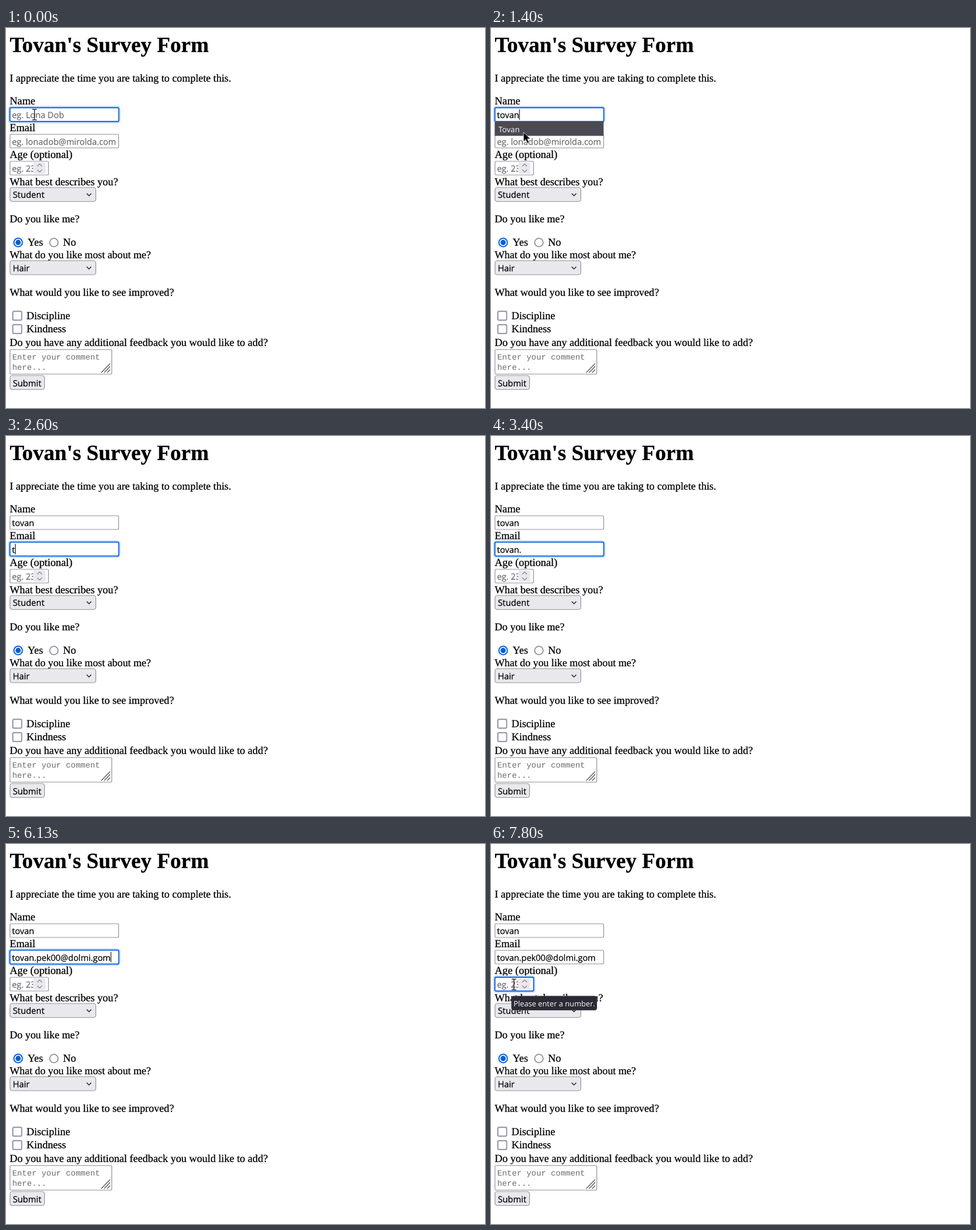
Animation of 840x667 px, one loop 8000 ms. Source, as an HTML page:

```html
<!DOCTYPE html>
<html lang="en">
<head>
<meta charset="utf-8">
<title>Survey Form</title>
<style>
  html, body { margin: 0; width: 100%; height: 100%; overflow: hidden; background: #fff; }
  svg { display: block; width: 840px; height: 667px; }
  text { white-space: pre; text-rendering: geometricPrecision; }
  .serif { font-family: "Liberation Serif", "Times New Roman", serif; stroke: #000; stroke-width: .3; }
  .ui { font-family: "Open Sans", "Noto Sans", sans-serif; stroke: #000; stroke-width: .25; }
  .mono { font-family: "Liberation Mono", monospace; }
  .hint { fill: #6c6c6c; }
  .ui.hint { stroke: #6c6c6c; }
  .light { fill: #fbfbfe; stroke: none; }
  .box { fill: #fff; stroke: #8f8f9d; stroke-width: 1.2; }
  .grey { fill: #e9e9ed; }
  .line { fill: none; stroke: #222; stroke-width: 1.5; }
</style>
</head>
<body>
<svg id="stage" viewBox="0 0 840 667" xmlns="http://www.w3.org/2000/svg"></svg>
<script>
const LOOP = 8000;
const stage = document.getElementById('stage');

const label = (x, y, s, size = 18.6, font = 'serif', extra = '') =>
  `<text class="${font}" x="${x}" y="${y}" font-size="${size}" ${extra}>${s}</text>`;
const rect = (x, y, w, h, r, cls = 'box', extra = '') =>
  `<rect class="${cls}" x="${x}" y="${y}" width="${w}" height="${h}" rx="${r}" ${extra}/>`;
const select = (y, s, size) =>
  rect(7, y, 150.5, 24.5, 4, 'box grey') + label(12, y + 18, s, size, 'ui') +
  `<path class="line" d="M141.5 ${y + 10.5}l4 4 4-4"/>`;
const check = (y, s) => rect(12, y, 15.5, 15.5, 2, 'box', 'style="stroke-width:1.9"') + label(36, y + 13.5, s);

const FIELDS = {
  name:  { y: 140, w: 190.5, hint: 'eg. Lona Dob' },
  email: { y: 186.5, w: 190.5, hint: 'eg. lonadob@mirolda.com' },
  age:   { y: 234, w: 67.5, hint: 'eg. 23' }
};
const field = (id, { y, w, hint }) => `
  <g id="${id}">
    ${rect(7, y, w, 24, 2)}
    <g class="ring" fill="none">
      ${rect(5, y - 2, w + 4, 28, 4.5, '', 'stroke="#bcd6fb" stroke-width="2.4"')}
      ${rect(6.8, y - .2, w + .4, 24.4, 2.5, '', 'stroke="#0060df" stroke-width="1.7"')}
    </g>
    <text class="ui value" x="10.5" y="${y + 18}" font-size="14.9"
      ${id === 'age' ? 'clip-path="url(#ageClip)"' : ''}>${hint}</text>
  </g>`;

stage.innerHTML = `
  <clipPath id="ageClip"><rect x="8" y="230" width="40" height="30"/></clipPath>
  ${label(6.5, 41.5, "Tovan's Survey Form", 38, 'serif', 'font-weight="700"')}
  ${label(6.5, 94, 'I appreciate the time you are taking to complete this.', 18.47)}
  ${label(6.5, 134, 'Name', 18.8)}
  ${label(6.5, 181, 'Email', 18.8)}
  ${label(6.5, 228, 'Age (optional)', 18.8)}
  ${label(6.5, 275.5, 'What best describes you?', 18.65)}
  ${label(6.5, 341, 'Do you like me?', 18.45)}
  ${label(38, 382, 'Yes', 18.5)}
  ${label(100, 382, 'No')}
  ${label(6.5, 403.5, 'What do you like most about me?', 18.35)}
  ${label(6.5, 470, 'What would you like to see improved?', 18.6)}
  ${label(6.5, 558, 'Do you have any additional feedback you would like to add?', 18.63)}
  ${Object.entries(FIELDS).map(([id, f]) => field(id, f)).join('')}
  ${rect(48.5, 236, 20.5, 20, 0, 'grey')}
  <path class="line" style="stroke:#8b8b93" d="M54.8 242.8l4.2-4 4.2 4M54.8 248.8l4.2 4 4.2-4"/>
  ${select(280, 'Student', 15.2)}
  ${select(408.5, 'Hair', 15)}
  <g fill="#fff" stroke-width="2">
    <circle cx="21.3" cy="376.5" r="7.5" stroke="#0060df"/>
    <circle cx="21.3" cy="376.5" r="4.7" fill="#0060df"/>
    <circle cx="84" cy="376.5" r="7.4" stroke="#8f8f9d" stroke-width="1.8"/>
  </g>
  ${check(497.3, 'Discipline')}
  ${check(520.8, 'Kindness')}
  ${rect(7, 564.5, 178.5, 43, 1.5)}
  ${label(11, 582, 'Enter your comment', 14.25, 'mono hint')}
  ${label(11, 600, 'here...', 14.25, 'mono hint')}
  <path class="line" style="stroke:#555;stroke-width:1.3" d="M167 605l15.5-16M172 605l10.5-11M177.5 605l5-5.5"/>
  ${rect(7, 610, 60.5, 24.5, 4, 'box grey')}
  ${label(12, 628.5, 'Submit', 15.1, 'ui')}
  <g id="popup">
    ${rect(6.5, 164.5, 191, 24.8, 0, '', 'id="row"')}
    ${label(13, 183, 'Tovan', 13.6, 'ui light')}
  </g>
  <rect id="caret" width="1.1" height="18.5"/>
  <g id="tip">
    ${rect(36, 267, 149.5, 24.5, 3.5, '', 'fill="#2b2a33" stroke="#45444f"')}
    ${label(39.5, 285, 'Please enter a number.', 13.2, 'ui light')}
  </g>
  <path id="beam" fill="none" stroke="#111" stroke-width="1.3"
    d="M-4 -9.3h3l1 1 1-1h3M0 -8.3v16.6M-4 9.3h3l1-1 1 1h3"/>
  <path id="arrow" fill="#000" stroke="#fff" stroke-width=".8"
    d="M0 0v16.5l3.9-3.7 2.9 6.5 3-1.3-2.9-6.3h5.4z"/>`;

const $ = id => document.getElementById(id);
const NAME = 'tovan', MAIL = 'tovan.pek00@dolmi.gom';
const beam = (x, y) => ({ kind: 'beam', x, y });
const arrow = (x, y) => ({ kind: 'arrow', x, y });

// Each step changes part of the state; name and email count typed letters.
const STEPS = [
  [0, { name: 0, email: 0, focus: 'name', caret: 0, popup: 0, hover: '', tip: 0, mouse: beam(50, 152) }],
  [70, { name: 1, popup: 1, mouse: null }],
  [200, { name: 2 }],
  [270, { name: 3, caret: 1 }],
  [400, { name: 4 }],
  [470, { name: 5, caret: 0 }],
  [530, { caret: 1 }],
  [800, { caret: 0 }],
  [1000, { mouse: beam(52, 122) }],
  [1070, { mouse: beam(53, 138) }],
  [1130, { mouse: beam(54, 152) }],
  [1200, { mouse: arrow(55, 166), popup: 2 }],
  [1270, { mouse: arrow(56, 176) }],
  [1330, { mouse: arrow(56, 181), caret: 1 }],
  [1400, { mouse: arrow(57, 183) }],
  [1470, { mouse: arrow(61, 186) }],
  [1530, { mouse: beam(69, 195), hover: 'email' }],
  [1600, { mouse: beam(74, 199) }],
  [1800, { focus: 'email', popup: 0, hover: '' }],
  [2330, { caret: 0 }],
  [2600, { email: 1, caret: 1, mouse: null }],
  [2800, { email: 2 }],
  [2870, { email: 3 }],
  [3000, { email: 4 }],
  [3130, { email: 5 }],
  [3200, { email: 6 }],
  [3400, { caret: 0 }],
  [3470, { email: 8, caret: 1 }],
  [3600, { email: 9, caret: 0 }],
  [3930, { caret: 1 }],
  [4070, { email: 10 }],
  [4270, { email: 11 }],
  [4470, { caret: 0 }],
  [4530, { email: 12, caret: 1 }],
  [4670, { email: 13 }],
  [4730, { email: 14 }],
  [4870, { email: 15 }],
  [4930, { email: 16 }],
  [5000, { email: 17, caret: 0 }],
  [5200, { email: 18 }],
  [5330, { email: 19, caret: 1 }],
  [5470, { caret: 0 }],
  [5530, { email: 20 }],
  [5600, { email: 21 }],
  [6130, { caret: 1 }],
  [6270, { mouse: beam(50, 225) }],
  [6330, { mouse: beam(42, 238), hover: 'age' }],
  [6400, { mouse: beam(34, 247) }],
  [6600, { mouse: beam(22, 250) }],
  [6670, { mouse: beam(10, 251), caret: 0 }],
  [6730, { mouse: beam(24, 250) }],
  [6800, { mouse: beam(35, 248.5) }],
  [7000, { focus: 'age', caret: 1, hover: '' }],
  [7270, { mouse: beam(40.3, 246.5) }],
  [7530, { caret: 0 }],
  [7800, { tip: 1 }]
];

const stateAt = t => Object.assign({}, ...STEPS.filter(([at]) => at <= t).map(([, s]) => s));
const show = (el, on) => el.setAttribute('visibility', on ? 'visible' : 'hidden');

function draw(t) {
  const s = stateAt(t);
  const typed = { name: NAME.slice(0, s.name), email: MAIL.slice(0, s.email), age: '' };
  for (const [id, f] of Object.entries(FIELDS)) {
    const value = $(id).querySelector('.value');
    const text = typed[id] || f.hint;
    if (value.textContent !== text) value.textContent = text;
    value.classList.toggle('hint', !typed[id]);
    show($(id).querySelector('.ring'), s.focus === id);
    $(id).querySelector('.box').style.stroke = s.hover === id ? '#676774' : '';
    if (s.focus === id) {
      const end = typed[id] ? value.getComputedTextLength() : 0.5;
      $('caret').setAttribute('x', 10.5 + end);
      $('caret').setAttribute('y', f.y + 2.8);
    }
  }
  show($('caret'), s.caret);
  show($('popup'), s.popup);
  $('row').setAttribute('fill', s.popup === 2 ? '#4b4a54' : '#2b2a33');
  show($('tip'), s.tip);
  for (const kind of ['beam', 'arrow']) {
    const on = s.mouse && s.mouse.kind === kind;
    show($(kind), on);
    if (on) $(kind).setAttribute('transform', `translate(${s.mouse.x} ${s.mouse.y})`);
  }
}

const start = performance.now();
function tick() {
  draw((performance.now() - start) % LOOP);
  requestAnimationFrame(tick);
}
tick();
</script>
</body>
</html>
```
